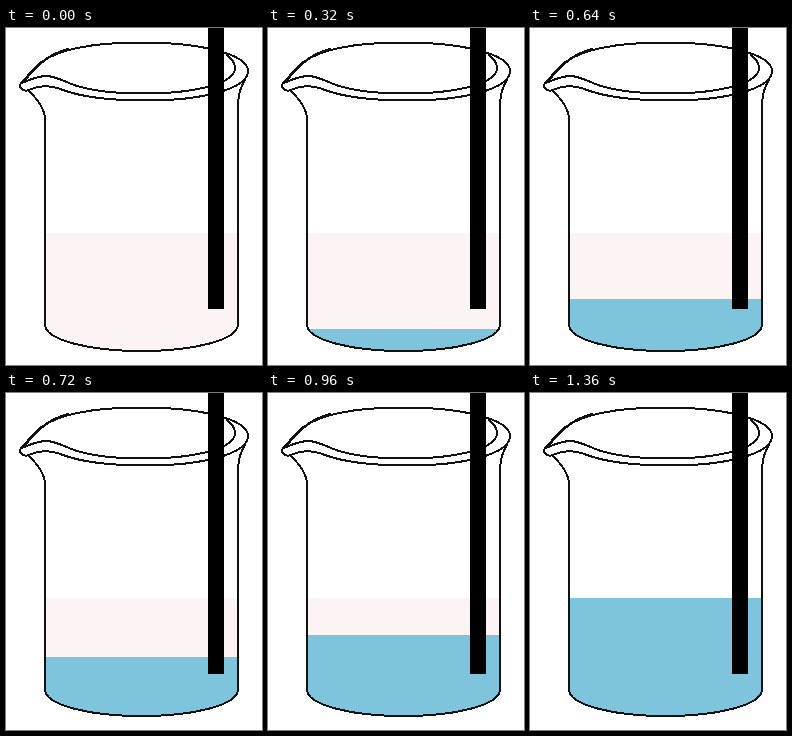
Animation of 256 by 337 pixels, one loop 1440 ms. Source, as an HTML page:

```html
<!DOCTYPE html>
<html lang="en">
<head>
<meta charset="utf-8">
<title>Filling beaker</title>
<style>
  html, body { margin: 0; width: 100%; height: 100%; overflow: hidden; background: #fff; }
  svg { display: block; width: 100vw; height: 100vh; shape-rendering: crispEdges; }
</style>
</head>
<body>
<svg viewBox="0 0 256 337">
  <clipPath id="inside">
    <path d="M39 92V297C40 312 83 323 135.5 323S231 312 232 297V92Z"/>
  </clipPath>
  <g clip-path="url(#inside)">
    <rect y="205" width="256" height="132" fill="#fbf3f4"/>
    <rect id="liquid" y="337" width="256" height="132" fill="#7fc4dd"/>
  </g>
  <g fill="none" stroke="#111" stroke-width="2" stroke-linecap="round" stroke-linejoin="round">
    <!-- walls and base -->
    <path d="M22 62C29 69 39 79 39 92V297C40 312 83 323 135.5 323S231 312 232 297V80C232 68 234 59 239 52"/>
    <!-- outer rim with spout -->
    <path d="M15 55C21 50 24 43 34 35C54 20 92 14.5 135 14.5C194 14.5 242 26 242 43C242 61 196 72.5 140 72.5C104 72.5 76 69 57 62C45 57 34 57 23 62C18 64 14 61 14 57Z"/>
    <!-- inner rim -->
    <path d="M16 55C27 50 33 48 41 48C52 49 56 53 71 58C88 63 111 65.5 137 65.5C191 65.5 229 55 229 40C229 35 226 31 221 27"/>
    <path d="M16 54C22 50 25 43 35 35C42 29 52 24 62 21" stroke-width="2.4"/>
  </g>
  <rect x="202" width="16" height="281"/>
</svg>
<script>
  const STEP = 80, STEPS = 18, EMPTY = 330.6, RISE = 7.4;
  const liquid = document.getElementById("liquid");

  function draw() {
    const step = Math.floor(performance.now() / STEP) % STEPS;
    liquid.setAttribute("y", Math.round(EMPTY - RISE * step));
    requestAnimationFrame(draw);
  }
  draw();
</script>
</body>
</html>
```
